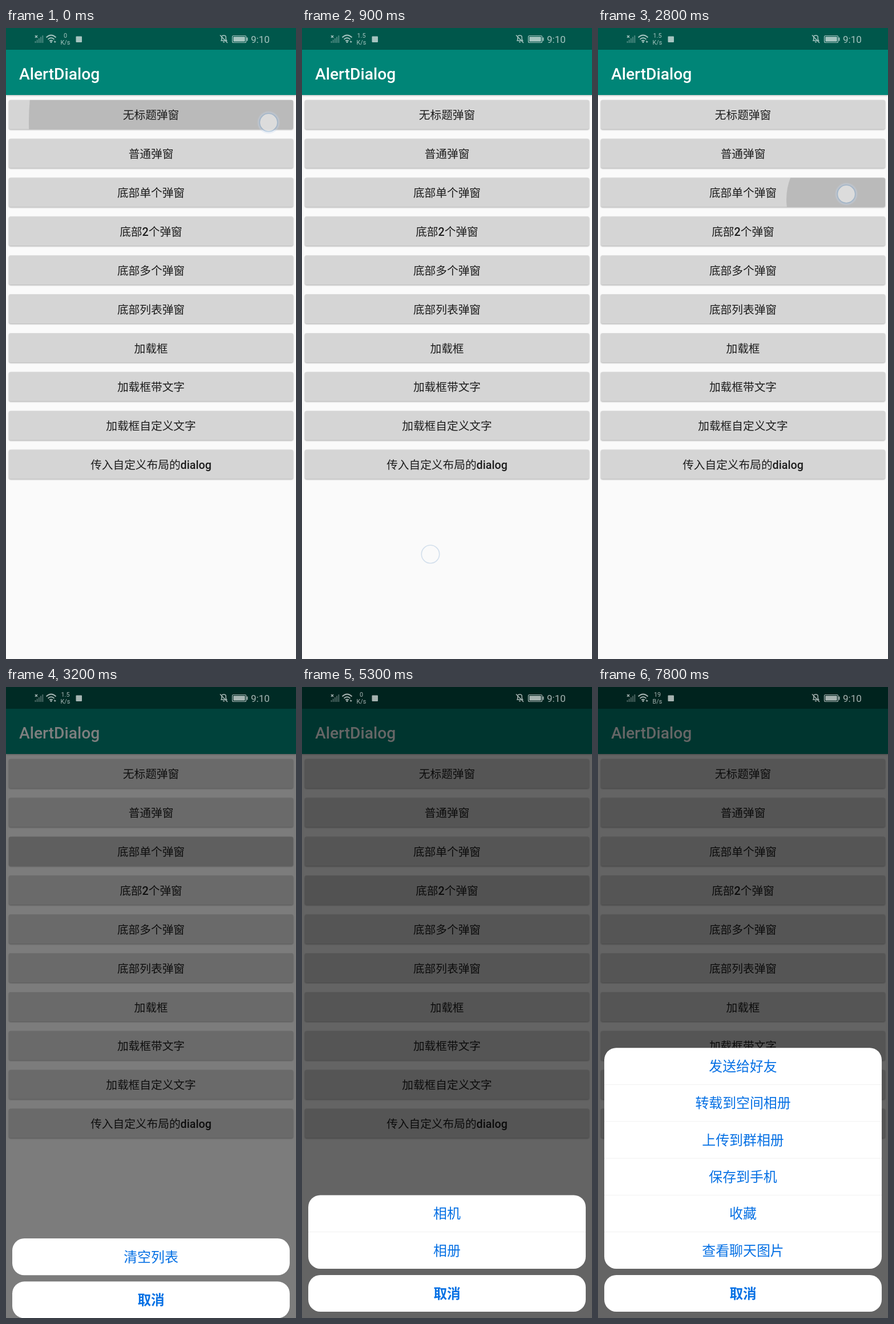
Recreate the animation shown at these times as an HTML page. Size 508 by 1102 pixels, loop 8 s.

```html
<!DOCTYPE html>
<html lang="zh-CN">
<head>
<meta charset="utf-8">
<title>AlertDialog</title>
<style>
  html, body { margin: 0; width: 100%; height: 100%; overflow: hidden; background: #fafafa; }
  svg { display: block; width: 508px; height: 1102px; font-family: Roboto, "Noto Sans CJK SC", "Noto Sans CJK", sans-serif; }
  .button { fill: #d5d5d5; filter: drop-shadow(0 1.3px 1.2px #0005); }
  .bar { filter: drop-shadow(0 1px 1.5px #0004); }
</style>
</head>
<body>
<svg id="stage" viewBox="0 0 508 1102"></svg>
<script>
const LOOP = 8000, STEP = 100, BLUE = '#0570e4';
const labels = ['无标题弹窗', '普通弹窗', '底部单个弹窗', '底部2个弹窗', '底部多个弹窗', '底部列表弹窗',
  '加载框', '加载框带文字', '加载框自定义文字', '传入自定义布局的dialog'];

// Button taps: row, x, time pressed
const taps = [[0, 460, -200], [1, 445, 1100], [2, 435, 2750], [3, 435, 4700], [4, 435, 6900]];
// Pointer: x, y, time down, time up
const touches = [[460, 165, -200, 100], [225, 919, 700, 900], [445, 232, 1100, 1300], [227, 923, 2000, 2200],
  [435, 290, 2800, 3000], [227, 905, 4100, 4300], [435, 357, 4700, 4900], [130, 838, 6000, 6200], [435, 425, 6900, 7100]];
const speeds = [[0, '0', 'K/s'], [800, '1.5', 'K/s'], [3700, '0', 'K/s'], [6700, '19', 'B/s']];

const text = (x, y, size, s, fill, weight = 400, anchor = 'middle') =>
  `<text x="${x}" y="${y + size * .365}" font-size="${size}" fill="${fill}" font-weight="${weight}" text-anchor="${anchor}">${s}</text>`;
const rect = (x, y, w, h, r, attrs) => `<rect x="${x}" y="${y}" width="${w}" height="${h}" rx="${r}" ${attrs}/>`;
const rowY = i => 125.7 + i * 67.87;
const clamp = v => Math.max(0, Math.min(1, v));

function alertCard(title) {
  const h = title ? 197 : 151, top = 569.5 - h / 2, bottom = top + h;
  return rect(38, top, 432, h, 22, 'fill="#fff"') +
    (title ? text(254, top + 47.5, 25, title, '#000', 700) : '') +
    text(254, bottom - 104, 22.6, '仿ixu弹窗', '#111') +
    rect(38, bottom - 61.5, 432, 1, 0, 'fill="#ececec"') +
    rect(252.8, bottom - 61, 1, 61, 0, 'fill="#dcdcdc"') +
    text(145, bottom - 29.5, 23.8, '取消', BLUE, 500) +
    text(361.5, bottom - 29.5, 23.8, '确定', BLUE, 500);
}

function sheet(items) {
  const rowH = 64.3, top = 1016 - rowH * items.length;
  return rect(11, top, 486, 1016 - top, 21, 'fill="#fff"') +
    items.map((s, i) => text(254, top + rowH * (i + .5), 23.9, s, BLUE) +
      (i ? rect(11, top + rowH * i - .5, 486, 1, 0, 'fill="#f1f1f1"') : '')).join('') +
    rect(11, 1027, 486, 64, 21, 'fill="#fff"') + text(254, 1059.5, 23.6, '取消', BLUE, 700);
}

// rise: distance a sheet slides; 0 for centred dialogs
const popups = [
  { html: alertCard(''), open: 150, close: 750, rise: 0 },
  { html: alertCard('标题'), open: 1250, close: 2050, rise: 0 },
  { html: sheet(['清空列表']), open: 2950, close: 4150, rise: 139 },
  { html: sheet(['相机', '相册']), open: 4950, close: 6050, rise: 215 },
  { html: sheet(['发送给好友', '转载到空间相册', '上传到群相册', '保存到手机', '收藏', '查看聊天图片']),
    open: 7150, close: 9000, rise: 472 },
];

const statusIcons = `<g fill="#fff" stroke="none" opacity=".65">
  <path d="M51 13l4 4m0-4l-4 4" stroke="#fff" stroke-width="1.5"/>
  ${[0, 1, 2, 3, 4].map(i => rect(50.5 + i * 3.2, 23 - i * 2.5, 2, 3 + i * 2.5, 0, 'opacity=".45"')).join('')}
  <g fill="none" stroke="#fff" stroke-width="1.8">
    <path d="M70.5 16.5q8.5-8 17 0M73.5 19.8q5.5-5 11 0M76.2 22.8q2.8-2.4 5.6 0"/>
    <path d="M377 22h9.5l-1.3-2v-4q0-3-3.7-3t-3.7 3v4zM375 12.500l13 13.500M380 24.500h3" stroke-width="1.5"/>
    <rect x="396.500" y="13.500" width="24" height="12" rx="2" stroke-width="1.2"/>
  </g>
  <circle cx="79" cy="24.500" r="1.5"/><path d="M84 22l4 2-3 2z"/>
  ${rect(122.500, 14.500, 10.500, 10.500, 1, '')}
  ${rect(398.300, 15.300, 20.400, 8.400, 1, '')}${rect(421.500, 16.500, 2, 6, .5, '')}
  <g id="speed"></g>
  ${text(429, 19.5, 17, '9:10', '#fff', 400, 'start')}
</g>`;

const stage = document.getElementById('stage');
stage.innerHTML = `
  <defs>${taps.map(([row], i) => `<clipPath id="clip${i}">${rect(5, rowY(row), 498, 51, 3, '')}</clipPath>`).join('')}</defs>
  ${rect(0, 0, 508, 1102, 0, 'fill="#fafafa"')}
  ${rect(0, 38, 508, 79, 0, 'fill="#008577" class="bar"')}
  ${rect(0, 0, 508, 38, 0, 'fill="#00574b"')}
  ${text(23, 79.300, 28.200, 'AlertDialog', '#fff', 500, 'start')}
  ${labels.map((s, i) => rect(5, rowY(i), 498, 51, 3, 'class="button"')).join('')}
  ${taps.map(([row, x], i) => `<g clip-path="url(#clip${i})"><circle class="ripple" cx="${x}" cy="${rowY(row) + 38}"/></g>`).join('')}
  ${labels.map((s, i) => text(254, rowY(i) + 26.500, 19.700, s, '#1c1c1c', 500)).join('')}
  <rect id="dim" width="508" height="1102"/>
  ${statusIcons}
  ${popups.map(p => `<g class="popup">${p.html}</g>`).join('')}
  <g id="pointer">
    <circle class="fill" r="17.500" fill="none" stroke="#c4d4ea" stroke-opacity=".3" stroke-width="4"/>
    <circle class="fill" r="15" fill="#e2e2e2" fill-opacity=".85"/>
    <circle id="ring" r="15.700" fill="none" stroke="#86acd0" stroke-width="1.6"/>
  </g>`;

const all = s => [...stage.querySelectorAll(s)];
const get = id => document.getElementById(id);
const ripples = all('.ripple'), groups = all('.popup'), fills = all('.fill');
const dim = get('dim'), pointer = get('pointer'), ring = get('ring'), speed = get('speed');
let shown = -1;

function draw(t) {
  taps.forEach(([, , down], i) => {
    const age = t - down;
    ripples[i].setAttribute('r', age < 0 ? 0 : age * 2.1);
    ripples[i].setAttribute('opacity', age < 0 ? 0 : .13 * clamp((650 - age) / 250));
  });

  let shade = 0;
  popups.forEach(({ open, close, rise }, i) => {
    const enter = clamp((t - open) / (rise ? 300 : 200));
    const leave = clamp((t - close) / 150);
    const visible = enter > 0 && leave < 1, g = groups[i];
    g.style.display = visible ? '' : 'none';
    if (!visible) return;
    shade = Math.max(shade, enter * (1 - leave));
    if (rise) {
      const hidden = Math.max((1 - enter) ** 1.4, leave * leave);
      g.setAttribute('transform', `translate(0 ${rise * hidden})`);
    } else {
      const k = .9 + .1 * (1 - (1 - enter) ** 2);
      g.setAttribute('transform', `translate(254 569.5) scale(${k}) translate(-254 -569.5)`);
      g.setAttribute('opacity', enter * (1 - leave));
    }
  });
  dim.setAttribute('opacity', .6 * shade);

  const touch = touches.find(([, , down, up]) => t >= down && t < up + STEP);
  pointer.style.display = touch ? '' : 'none';
  if (touch) {
    const lifted = t >= touch[3];
    pointer.setAttribute('transform', `translate(${touch[0]} ${touch[1]})`);
    fills.forEach(c => c.style.display = lifted ? 'none' : '');
    ring.setAttribute('opacity', lifted ? .35 : .5);
  }

  const [, value, unit] = speeds.filter(s => t >= s[0]).pop();
  speed.innerHTML = text(104, 13, 10.800, value, '#fff') + text(104, 25.500, 10.800, unit, '#fff');
}

function tick() {
  const t = Math.floor(performance.now() % LOOP / STEP) * STEP;
  if (t !== shown) draw(shown = t);
  requestAnimationFrame(tick);
}
tick();
</script>
</body>
</html>
```
